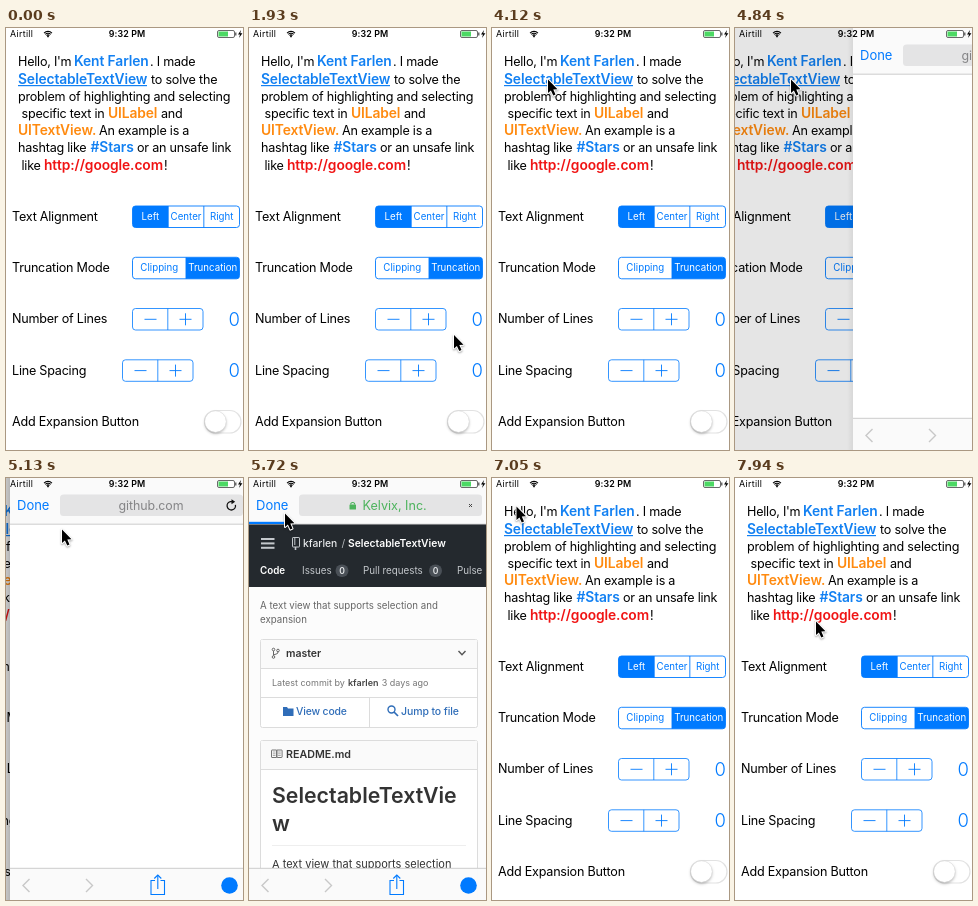
These frames come from a looping animation (237x422 px, 8 s). An HTML page with a canvas:

```html
<!DOCTYPE html>
<html lang="en">
<head>
<meta charset="utf-8">
<title>Selectable text demo</title>
<style>
html, body { margin: 0; width: 100%; height: 100%; overflow: hidden; background: #fff; }
canvas { display: block; width: 237px; height: 422px; }
</style>
</head>
<body>
<canvas id="stage"></canvas>
<script>
const W = 237, H = 422, LOOP = 8000;
const BLUE = '#007aff', ACCENT = '#1280f2', ORANGE = '#ff8a0f', RED = '#f01414', LINK = '#2f6db8';
const canvas = document.getElementById('stage');
const c = canvas.getContext('2d');
const dpr = window.devicePixelRatio || 1;
canvas.width = W * dpr;
canvas.height = H * dpr;

function text(s, x, y, size, color = '#000', weight = 400, gap = 0, align = 'left') {
  c.font = `${weight} ${size}px Inter, "Liberation Sans", sans-serif`;
  c.letterSpacing = gap + 'px';
  c.textAlign = align;
  c.fillStyle = color;
  c.fillText(s, x, y);
}
const body = (s, x, y) => text(s, x, y, 12.6, '#000', 400, -0.23);
const strong = (s, x, y, color) => text(s, x, y, 13.8, color, 600, -0.1);

function rect(x, y, w, h, color) {
  c.fillStyle = color;
  c.fillRect(x, y, w, h);
}
function box(x, y, w, h, r, fill, stroke, width = 1) {
  c.beginPath();
  c.roundRect(x, y, w, h, r);
  if (fill) { c.fillStyle = fill; c.fill(); }
  if (stroke) { c.strokeStyle = stroke; c.lineWidth = width; c.stroke(); }
}
function line(color, width, ...p) {
  c.beginPath();
  c.moveTo(p[0], p[1]);
  for (let i = 2; i < p.length; i += 2) c.lineTo(p[i], p[i + 1]);
  c.strokeStyle = color;
  c.lineWidth = width;
  c.stroke();
}
function shape(color, ...p) {
  c.beginPath();
  for (let i = 0; i < p.length; i += 2) c.lineTo(p[i], p[i + 1]);
  c.closePath();
  c.fillStyle = color;
  c.fill();
}
function arc(x, y, r, color, width, a = 0, b = Math.PI * 2) {
  c.beginPath();
  c.arc(x, y, r, a, b);
  c.strokeStyle = color;
  c.lineWidth = width;
  c.stroke();
}
function dot(x, y, r, color) {
  c.beginPath();
  c.arc(x, y, r, 0, Math.PI * 2);
  c.fillStyle = color;
  c.fill();
}
function shadow(alpha, blur, dy) {
  c.shadowColor = `rgba(0,0,0,${alpha})`;
  c.shadowBlur = blur * dpr;
  c.shadowOffsetY = dy * dpr;
}

function statusBar() {
  text('Airtill', 4, 9, 8.9, '#000', 400, 0.3);
  for (const r of [2, 3.8, 5.6]) arc(42, 9, r, '#000', 1.1, -Math.PI * 0.75, -Math.PI * 0.25);
  dot(42, 8.4, 0.9, '#000');
  text('9:32 PM', 121, 9, 8.9, '#000', 600, 0.1, 'center');
  box(211.5, 2.5, 17, 7, 1.5, '#fff', '#444', 0.8);
  rect(212.5, 3.5, 9.5, 5, '#4cd964');
  rect(229.2, 4.5, 1.2, 3, '#444');
  shape('#000', 235, 2, 232, 6.5, 234, 6.5, 233, 10, 236.4, 5.2, 234.3, 5.2);
}

function segments(y, labels) {
  const x = 126.5, w = 107, step = w / labels.length;
  c.save();
  c.beginPath();
  c.roundRect(x, y, w, 21.5, 3);
  c.clip();
  labels.forEach(([s, on], i) => {
    if (on) rect(x + i * step, y, step, 22, BLUE);
    if (i) line(BLUE, 0.9, x + i * step, y, x + i * step, y + 22);
    text(s, x + (i + 0.5) * step, y + 14, 9.7, on ? '#fff' : BLUE, 400, 0.02, 'center');
  });
  c.restore();
  box(x, y, w, 21.5, 3, null, BLUE, 0.9);
}
function stepper(x, y) {
  const my = y + 10.8;
  box(x, y, 70.5, 21.5, 3, null, BLUE, 0.8);
  line(BLUE, 0.8, x + 35.3, y, x + 35.3, y + 21.5);
  line(BLUE, 0.9, x + 12, my, x + 24, my);
  line(BLUE, 0.9, x + 47, my, x + 59, my);
  line(BLUE, 0.9, x + 53, my - 6, x + 53, my + 6);
  text('0', 234, y + 17.5, 18.5, BLUE, 300, 0, 'right');
}

function settings() {
  rect(0, 0, W, H, '#fff');
  body("Hello, I'm", 12, 38.3);
  strong('Kent Farlen', 68, 38.3, ACCENT);
  body('. I made', 144, 38.3);
  strong('SelectableTextView', 12, 55.6, ACCENT);
  rect(12, 57, 129, 1.2, ACCENT);
  body('to solve the', 145, 55.6);
  body('problem of highlighting and selecting', 12, 72.7);
  body('specific text in', 15.5, 89.9);
  strong('UILabel', 102, 89.9, ORANGE);
  body('and', 155, 89.9);
  strong('UITextView.', 12, 107, ORANGE);
  body('An example is a', 93, 107);
  body('hashtag like', 12, 124.2);
  strong('#Stars', 84.5, 124.2, ACCENT);
  body('or an unsafe link', 131, 124.2);
  body('like', 15.5, 141.5);
  strong('http://google.com', 38, 141.5, RED);
  body('!', 158, 141.5);

  ['Text Alignment', 'Truncation Mode', 'Number of Lines', 'Line Spacing', 'Add Expansion Button']
    .forEach((s, i) => body(s, 6, 192.5 + i * 51.4));
  segments(178, [['Left', true], ['Center'], ['Right']]);
  segments(229.3, [['Clipping'], ['Truncation', true]]);
  stepper(126.5, 280.5);
  stepper(116.5, 331.8);

  box(198.5, 382.5, 36.5, 22.5, 11.2, '#fff', '#e2e2e2', 1.2);
  c.save();
  shadow(0.3, 3, 1.5);
  dot(209.5, 393.6, 10.6, '#fff');
  c.restore();
  arc(209.5, 393.6, 10.8, '#dcdcdc', 0.6);
}

function badge(x) {
  box(x, 86.5, 13, 12.5, 6.2, '#4a5057');
  text('0', x + 6.5, 96, 8.6, '#e4e6e8', 600, 0, 'center');
}

function repoPage() {
  rect(0, 46, W, 63, '#24292e');
  for (const y of [60, 64.4, 68.8]) rect(12, y, 13.5, 2, '#c4c8cc');
  box(43.5, 59.5, 7, 9.5, 0.6, null, '#c4c8cc', 1);
  line('#c4c8cc', 1, 45.8, 59.5, 45.8, 67);
  line('#c4c8cc', 1.6, 46.5, 69, 46.5, 72);
  text('kfarlen', 54, 68.5, 10.3, '#e8eaec', 500);
  text('/', 92.5, 68.5, 10.3, '#b4b8bc');
  text('SelectableTextView', 99, 68.5, 10.3, '#fff', 600);
  text('Code', 11, 96, 9.8, '#fff', 600);
  text('Issues', 53, 96, 9.8, '#c4c8cc');
  badge(86.5);
  text('Pull requests', 114, 96, 9.8, '#c4c8cc');
  badge(180);
  text('Pulse', 208, 96, 9.8, '#c4c8cc');

  text('A text view that supports selection and', 11, 131, 9.7, '#666');
  text('expansion', 11, 144.5, 9.7, '#666');

  const edge = '#dcdcdc';
  box(11.5, 161.5, 217, 88, 2, '#fff', edge);
  rect(12, 162, 216, 28, '#fafafa');
  line(edge, 1, 12, 190.5, 228, 190.5);
  line(edge, 1, 12, 219.5, 228, 219.5);
  line(edge, 1, 120.5, 219.5, 120.5, 249);
  arc(24.5, 171.5, 1.3, '#666', 1);
  arc(24.5, 179, 1.3, '#666', 1);
  arc(29, 172.5, 1.3, '#666', 1);
  line('#666', 1, 24.5, 173, 24.5, 177.5);
  line('#666', 1, 29, 174, 28.5, 175.5, 24.5, 177);
  text('master', 37, 178.5, 10.5, '#333', 600);
  line('#555', 1.4, 209.5, 173, 213, 176.8, 216.5, 173);
  text('Latest commit by', 23, 207.5, 9, '#767676');
  text('kfarlen', 99, 207.5, 9, '#444', 600);
  text('3 days ago', 179.5, 207.5, 9, '#767676', 400, 0, 'right');
  shape(LINK, 34, 229, 38, 229, 39, 230.5, 44.5, 230.5, 44.5, 238, 34, 238);
  text('View code', 47, 237, 10.4, LINK, 500, -0.15);
  arc(142.5, 231.5, 3.5, LINK, 1.4);
  line(LINK, 1.7, 145, 234, 149, 238);
  text('Jump to file', 152, 237, 10.5, LINK, 500, -0.1);

  box(11.5, 262.5, 217, 180, 2, '#fff', edge);
  rect(12, 263, 216, 28, '#fafafa');
  line(edge, 1, 12, 291.5, 228, 291.5);
  for (const x of [22.5, 27.8]) {
    box(x, 272, 5.3, 7.5, 0.5, null, '#666', 0.9);
    for (const y of [274, 275.8, 277.5]) line('#888', 0.7, x + 1.3, y, x + 4, y);
  }
  text('README.md', 37, 280, 10.7, '#333', 600);
  text('SelectableTextVie', 23, 325, 21.3, '#333', 600);
  text('w', 23, 353, 21.3, '#333', 600);
  line('#eee', 1, 23, 367.5, 217, 367.5);
  text('A text view that supports selection', 23, 390, 11, '#333');
}

function browser(k) {
  const loaded = k >= 35, loading = k >= 34 && k < 41;
  rect(0, 0, W, H, loaded ? '#fcfcfc' : '#fff');
  if (loaded) repoPage();

  rect(0, 0, W, 46, '#fafafa');
  line('#c0c0c0', 0.8, 0, 46.2, W, 46.2);
  text('Done', 7, 32, 13, BLUE);
  box(50, 16.5, 183, 21.5, 3.5, '#e4e4e5');
  if (loaded) {
    box(100.5, 26.5, 6.5, 5, 0.6, '#4cb35c');
    arc(103.7, 26.5, 2, '#4cb35c', 1.1, Math.PI, 0);
    text('Kelvix, Inc.', 113.5, 31.5, 12.6, '#4cb35c');
  } else {
    text('github.com', 141, 31.5, 12.4, '#858587', 400, -0.1, 'center');
  }
  if (loading) {
    const m = k < 37 ? 1.5 : 3.5;
    line('#444', 1, 221.5 - m, 27.5 - m, 221.5 + m, 27.5 + m);
    line('#444', 1, 221.5 + m, 27.5 - m, 221.5 - m, 27.5 + m);
    const done = k < 37 ? 35 * (k - 33) / 3 : Math.min(W, 35 + (k - 36) * 52);
    rect(0, 43.8, done, 2.2, BLUE);
  } else {
    arc(221.3, 27.8, 4.2, '#111', 1.3, -0.2, Math.PI * 1.6);
    shape('#111', 221.5, 21.2, 225.2, 23.8, 221.5, 26.2);
  }

  rect(0, 390, W, 32, 'rgba(250,250,250,.97)');
  line('#c0c0c0', 0.8, 0, 390.3, W, 390.3);
  line('#c8c8c8', 1.4, 19.5, 401, 13, 407.5, 19.5, 414);
  line('#c8c8c8', 1.4, 76, 401, 82.5, 407.5, 76, 414);
  line(BLUE, 1.1, 145, 402.5, 141, 402.5, 141, 416.5, 154.5, 416.5, 154.5, 402.5, 150.5, 402.5);
  line(BLUE, 1.1, 147.8, 411, 147.8, 397);
  line(BLUE, 1.1, 144.3, 400.5, 147.8, 397, 151.3, 400.5);
  dot(219.5, 407.5, 8.3, BLUE);
}

// Pointer waypoints: tick, x, y
const PATH = [
  [0, 221, 333], [9, 221, 333], [11, 188, 280], [13, 149, 218], [14, 149, 218], [15, 115.5, 155],
  [17, 89, 112], [19, 69, 74], [22, 56, 52], [24, 55, 50], [25, 55.5, 51], [32, 55.5, 51],
  [36, 35.5, 35], [39, 27, 25], [41, 24, 28], [46, 24, 28], [48, 43, 76], [50, 77, 145], [51, 80.5, 143]
];
function pointer(k) {
  let i = PATH.findIndex(p => p[0] > k);
  if (i < 0) i = PATH.length - 1;
  const a = PATH[i - 1], b = PATH[i];
  const u = Math.min(1, (k - a[0]) / (b[0] - a[0]));
  c.save();
  c.translate(a[1] + (b[1] - a[1]) * u, a[2] + (b[2] - a[2]) * u);
  c.lineJoin = 'round';
  c.beginPath();
  const p = [0.5, 0.5, 0.5, 14, 3.4, 11.4, 5.8, 16.6, 8, 15.6, 5.8, 10.5, 10, 10.2];
  for (let j = 0; j < p.length; j += 2) c.lineTo(p[j], p[j + 1]);
  c.closePath();
  shadow(0.35, 2, 1);
  c.strokeStyle = '#fff';
  c.lineWidth = 2;
  c.stroke();
  shadow(0, 0, 0);
  c.fillStyle = '#000';
  c.fill();
  c.restore();
}

// Share of the stage still uncovered by the browser: springs in, then out
function uncovered(k) {
  if (k < 30 || k >= 45) return 1;
  if (k >= 43) return 1 - 0.0464 * Math.exp(-1.69 * (k - 43));
  return k < 34 ? Math.exp(-0.7 - 1.69 * (k - 30)) : 0;
}

function draw(t) {
  const k = Math.floor((t - 428) / 146.86);
  const open = uncovered(k), x = Math.round(W * open);
  c.setTransform(dpr, 0, 0, dpr, 0, 0);
  rect(0, 0, W, H, '#fff');
  if (x > 0) {
    c.save();
    c.translate(-Math.round(71 * (1 - open)), 0);
    settings();
    c.restore();
  }
  if (open < 1) {
    rect(0, 0, W, H, `rgba(0,0,0,${(open > 0.9 ? 0.3 : 0.2) * (1 - open)})`);
    const g = c.createLinearGradient(x - 6, 0, x, 0);
    g.addColorStop(0, 'rgba(0,0,0,0)');
    g.addColorStop(1, `rgba(0,0,0,${0.12 * (1 - open)})`);
    rect(x - 6, 0, 6, H, g);
    c.save();
    c.translate(x, 0);
    browser(k);
    c.restore();
  }
  statusBar();
  if (k >= 0) pointer(k);
}

const start = performance.now();
function tick() {
  draw((performance.now() - start) % LOOP);
  requestAnimationFrame(tick);
}
tick();
</script>
</body>
</html>
```
